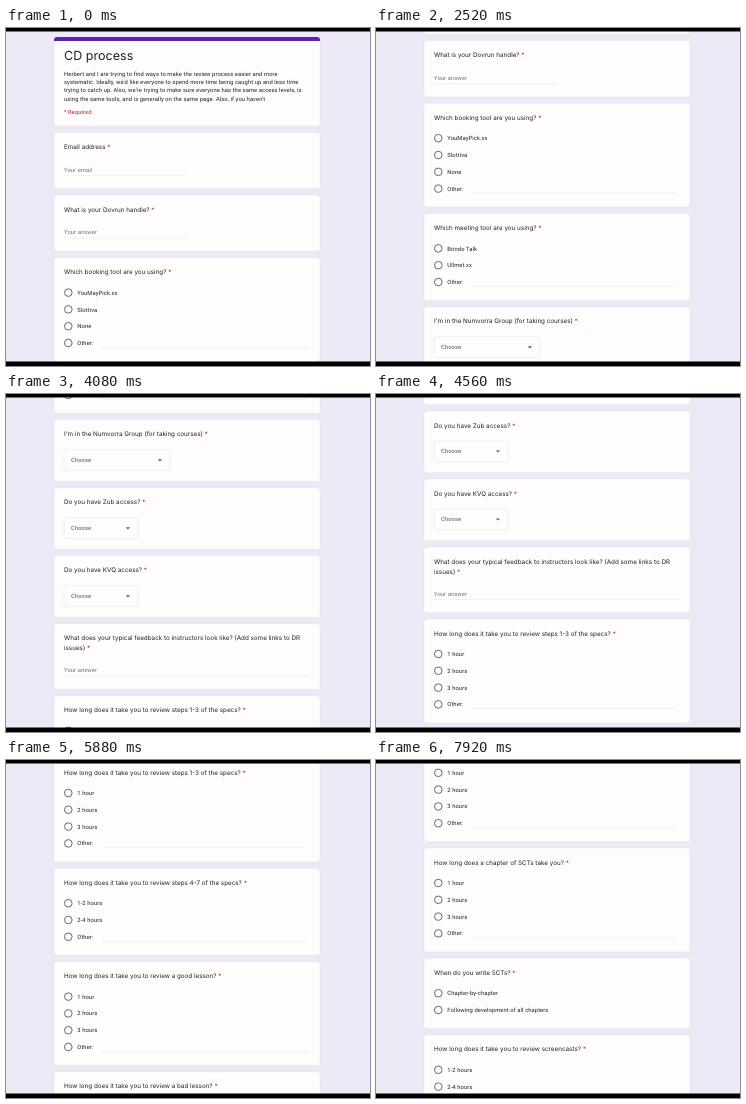
Recreate the animation shown at these times as an HTML page. Size 364 px wide and 338 px high, loop 8 s.

```html
<!DOCTYPE html>
<html lang="en">
<head>
<meta charset="utf-8">
<title>Form scroll</title>
<style>
  html, body { margin: 0; width: 100%; height: 100%; overflow: hidden; background: #ece8f6; }
  svg { display: block; width: 364px; height: 338px; }
  text { font: 5.82px Roboto, sans-serif; letter-spacing: .083px; fill: #202124; text-rendering: geometricPrecision; white-space: pre; }
  .title { font: 12.57px Inter, sans-serif; letter-spacing: 0; }
  .question { font: 6.3px Inter, sans-serif; letter-spacing: 0; }
  .hint { fill: #70757a; }
  .choose { fill: #70757a; font-weight: 500; }
  .red { fill: #d01c2b; }
  .card { fill: #fffdfc; stroke: #dfdce4; stroke-width: .4; }
  .rule { stroke: #e3e1e2; stroke-width: .5; }
  .radio { fill: none; stroke: #5f6368; stroke-width: .95; }
  .select { fill: none; stroke: #dfdddf; stroke-width: .5; }
</style>
</head>
<body>
<svg viewBox="0 0 364 338">
  <rect width="364" height="338" fill="#ece8f6"/>
  <g id="page"></g>
  <path d="M0 0H364V3.5H0ZM0 333.5H364V338H0Z"/>
</svg>
<script>
const LEFT = 58, GAP = 6.3, ROW = 16.8;

const text = (x, y, s, cls = '') => `<text x="${x}" y="${y}" class="${cls}">${s}</text>`;
const rule = (x1, x2, y) => `<path class="rule" d="M${x1} ${y}H${x2}"/>`;
const card = (y, h) => `<rect class="card" x="48" y="${y}" width="266" height="${h}" rx="3"/>`;

// Each body returns its height and its markup below the question.
const answer = (hint, end = 181, extra = 0) => y => [56.3 + extra,
  text(LEFT, y + 39.3 + extra, hint, 'hint') + rule(LEFT, end, y + 43 + extra)];

const radios = (...labels) => y => [53.5 + ROW * (labels.length - 1),
  labels.map((label, i) => {
    const cy = y + 35 + ROW * i;
    return `<circle class="radio" cx="62.3" cy="${cy}" r="3.8"/>` + text(71.3, cy + 2.1, label) +
      (label === 'Other:' ? rule(96, 300.5, cy + 4.4) : '');
  }).join('')];

const select = width => y => [61.7,
  `<rect class="select" x="${LEFT}" y="${y + 30}" width="${width}" height="20.8" rx="1.5"/>` +
  text(65, y + 42.3, 'Choose', 'choose') +
  `<path fill="#5f6368" d="M${LEFT + width - 12.3} ${y + 39.4}h4.4l-2.2 2.2z"/>`];

const hours = radios('1 hour', '2 hours', '3 hours', 'Other:');
const ranges = radios('1-2 hours', '2-4 hours', 'Other:');

const questions = [
  ['Email address', answer('Your email')],
  ['What is your Dovrun handle?', answer('Your answer')],
  ['Which booking tool are you using?', radios('YouMayPick.xx', 'Slottiva', 'None', 'Other:')],
  ['Which meeting tool are you using?', radios('Brindo Talk', 'Ullmet.xx', 'Other:')],
  ["I'm in the Numvorra Group (for taking courses)", select(106)],
  ['Do you have Zub access?', select(74)],
  ['Do you have KVQ access?', select(74)],
  ['What does your typical feedback to instructors look like? (Add some links to DR\nissues)', answer('Your answer', 304, 9.4)],
  ['How long does it take you to review steps 1-3 of the specs?', hours],
  ['How long does it take you to review steps 4-7 of the specs?', ranges],
  ['How long does it take you to review a good lesson?', hours],
  ['How long does it take you to review a bad lesson?', hours],
  ['How long does a chapter of SCTs take you?', hours],
  ['When do you write SCTs?', radios('Chapter-by-chapter', 'Following development of all chapters')],
  ['How long does it take you to review screencasts?', ranges]
];

const intro = [
  'Herbert and I are trying to find ways to make the review process easier and more',
  "systematic. Ideally, we'd like everyone to spend more time being caught up and less time",
  "trying to catch up. Also, we're trying to make sure everyone has the same access levels, is",
  "using the same tools, and is generally on the same page. Also, if you haven't"
];

let markup = card(9, 89.1) +
  '<path fill="#5c20b4" d="M48 13V12a3 3 0 0 1 3-3H311a3 3 0 0 1 3 3V13Z"/>' +
  text(LEFT, 31.8, 'CD process', 'title') +
  intro.map((line, i) => text(LEFT, 47.5 + 8.45 * i, line)).join('') +
  text(LEFT, 86.2, '* Required', 'red');

let cardY = 104.4;
for (const [question, body] of questions) {
  const [height, content] = body(cardY);
  const lines = question.split('\n');
  lines[lines.length - 1] += ' <tspan class="red">*</tspan>';
  markup += card(cardY, height) + content +
    lines.map((line, i) => text(LEFT, cardY + 16.6 + 10 * i, line, 'question')).join('');
  cardY += height + GAP;
}
const page = document.getElementById('page');
page.innerHTML = markup;

// [time in ms, scroll offset]
const path = [[1080, 0], [1560, 17], [1680, 17], [3480, 311.4], [4560, 484.2],
  [5880, 711.2], [6840, 868.1], [7920, 1045.2]];

function scrollAt(t) {
  if (t <= path[0][0]) return 0;
  const i = path.findIndex(([time]) => time >= t);
  const [t0, s0] = path[i - 1], [t1, s1] = path[i];
  return s0 + (s1 - s0) * (t - t0) / (t1 - t0);
}

function draw() {
  const t = Math.floor(performance.now() % 8000 / 120) * 120;
  page.setAttribute('transform', `translate(0 ${-scrollAt(t)})`);
  requestAnimationFrame(draw);
}
draw();
</script>
</body>
</html>
```
